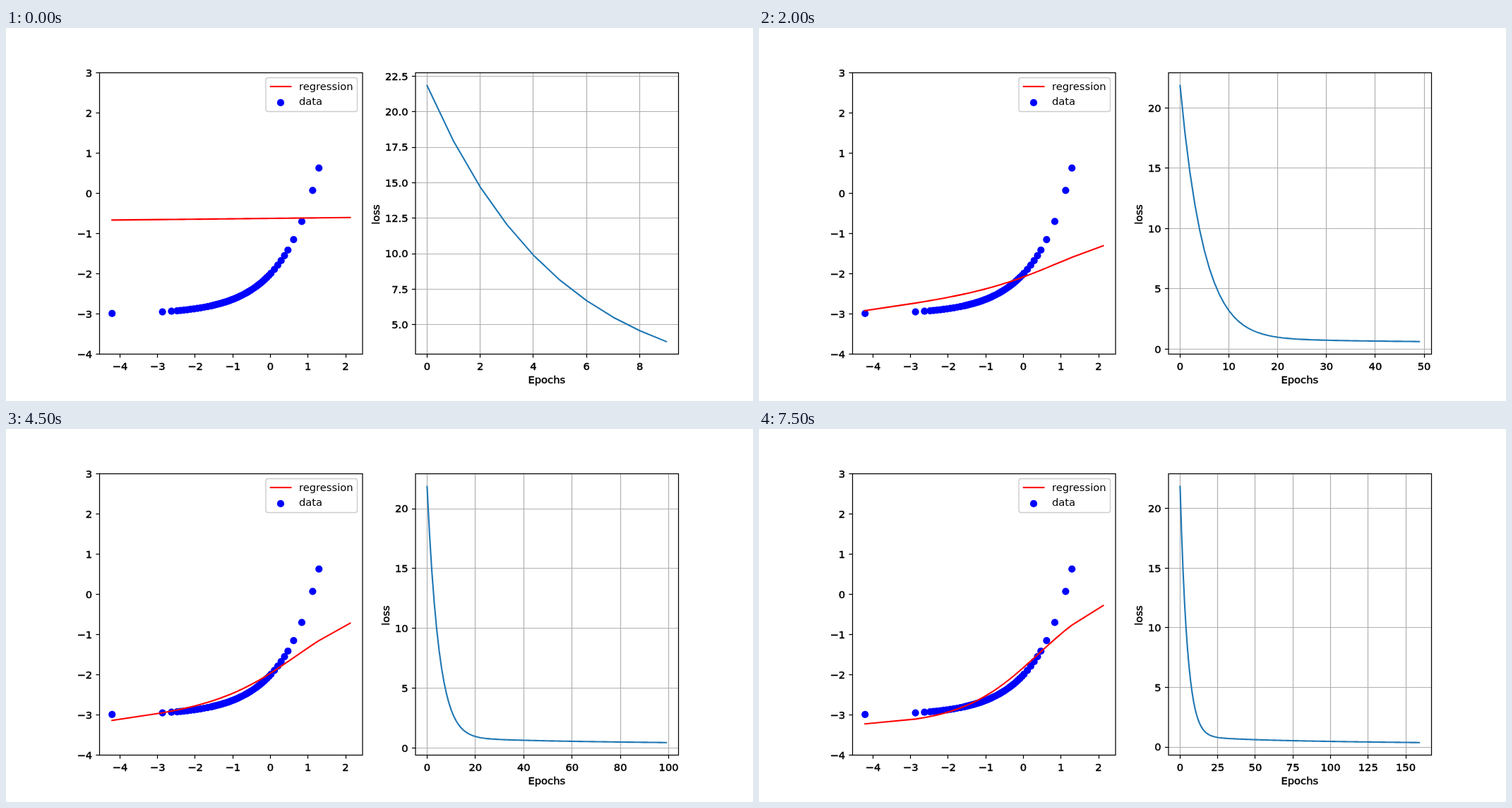
An HTML page that plays this animation: 1058 px wide and 529 px high, repeating every 8 s.

```html
<!DOCTYPE html>
<html lang="en">
<head>
<meta charset="utf-8">
<title>Regression training</title>
<style>
html, body { margin: 0; width: 100%; height: 100%; overflow: hidden; background: #fff; }
svg { display: block; width: 100vw; height: 100vh; }
text { font: 14.69px "DejaVu Sans", sans-serif; }
.tick, .name { stroke: #000; stroke-width: .45px; }
.axis { fill: none; stroke: #000; stroke-width: 1.25; }
.grid { fill: none; stroke: #b0b0b0; stroke-width: 1.2; }
.curve { fill: none; stroke-width: 2.1; stroke-linecap: square; stroke-linejoin: round; }
</style>
</head>
<body>
<svg viewBox="0 0 1058 529">
  <g id="left"></g>
  <g id="dots" fill="#00f"></g>
  <path id="fit" class="curve" stroke="#f00"/>
  <rect class="axis" x="132.5" y="63.5" width="372.5" height="399"/>
  <rect x="368" y="70.5" width="129.5" height="48" rx="2.9" fill="#fff" fill-opacity=".8" stroke="#ccc" stroke-width="1.4"/>
  <path class="curve" stroke="#f00" d="M374.8 83H403.4"/>
  <circle cx="389" cy="105.9" r="5.1" fill="#00f"/>
  <text x="415" y="88">regression</text>
  <text x="415" y="109.2">data</text>
  <g id="right"></g>
  <path id="loss" class="curve" stroke="#1f77b4"/>
  <rect class="axis" x="580" y="63.5" width="372.5" height="399"/>
  <text class="name" x="765.8" y="504.2" text-anchor="middle">Epochs</text>
  <text class="name" id="lossName" text-anchor="middle">loss</text>
</svg>
<script>
const $ = id => document.getElementById(id);
const TOP = 63.48, BOTTOM = 462.87, HEIGHT = BOTTOM - TOP;
const snap = v => Math.floor(v) + 0.5;
const polyline = pts => 'M' + pts.map(p => p[0].toFixed(2) + ' ' + p[1].toFixed(2)).join('L');

function ticks(lo, hi, step) {
  const out = [];
  for (let v = Math.ceil(lo / step) * step; v <= hi; v += step) out.push(v);
  return out;
}

function label(v, step) {
  return (v < 0 ? '\u2212' : '') + Math.abs(v).toFixed(step % 1 ? 1 : 0);
}

function xTick(x, text) {
  return `<path class="axis" d="M${snap(x)} ${snap(BOTTOM)}v5.1"/>` +
    `<text class="tick" x="${x}" y="484.5" text-anchor="middle">${text}</text>`;
}

function yTick(left, y, text) {
  return `<path class="axis" d="M${left} ${snap(y)}h-5.1"/>` +
    `<text class="tick" x="${left - 10.4}" y="${y + 5.3}" text-anchor="end">${text}</text>`;
}

// Left plot: fixed axes and samples of exp(x) - 3
const dataX = x => 374.5 + x * 53.27;
const dataY = y => BOTTOM - (y + 4) * HEIGHT / 7;

$('left').innerHTML =
  ticks(-4, 2, 1).map(v => xTick(dataX(v), label(v, 1))).join('') +
  ticks(-4, 3, 1).map(v => yTick(132.5, dataY(v), label(v, 1))).join('');

// Sparse outliers around a cluster that is densest near -0.8
const samples = [-4.21, -2.87, -2.63, 0.617, 0.8345, 1.1235, 1.29, 2.12];
for (let x = -2.48; x < 0.5; x += Math.abs(x + 0.8) < 0.8 ? 0.055 : 0.09) samples.push(x);
samples.sort((a, b) => a - b);

$('dots').innerHTML = samples.filter(x => x < 2).map(x =>
  `<circle cx="${dataX(x)}" cy="${dataY(Math.exp(x) - 3)}" r="5.1"/>`).join('');

// The fit leaves its flat start quickly, then a tanh bend grows and moves left
function fitAt(x, k) {
  const level = -2.17 + 0.0235 * k;
  const slope = 0.128 - 0.00095 * (k - 4.5) ** 2;
  const bend = 0.04 + 0.125 * k - 0.0011 * k * k;
  const center = 1.05 - 0.043 * k;
  const trained = level + slope * x + bend * (Math.tanh((x - center) / 2) + Math.tanh(center / 2));
  const untrained = -0.62 + 0.01 * x;
  return trained + (untrained - trained) * Math.exp(-1.1 * k ** 1.4);
}

function drawFit(k) {
  $('fit').setAttribute('d', polyline(samples.map(x => [dataX(x), dataY(fitAt(x, k))])));
}

// Right plot: loss history with rescaled axes
function lossAt(e) {
  return 20.393 * Math.exp(-e * (0.2038 + 0.0017 * e)) + 1.457 - 0.2135 * Math.log(e + 1);
}

function niceStep(span, bins) {
  const raw = span / bins, unit = 10 ** Math.floor(Math.log10(raw));
  return [1, 2, 2.5, 5, 10].find(m => m * unit >= raw) * unit;
}

function drawLoss(count) {
  const end = count - 1, high = lossAt(0), low = lossAt(end), range = high - low;
  const px = e => 596.4 + 338.8 * e / end;
  const py = v => TOP + HEIGHT * (0.05 + (high - v) / range) / 1.1;
  const xStep = niceStep(end * 1.1, 8), yStep = niceStep(range * 1.1, 9);
  const xs = ticks(-0.05 * end, 1.05 * end, xStep);
  const ys = ticks(low - 0.05 * range, high + 0.05 * range, yStep);
  $('right').innerHTML =
    xs.map(v => `<path class="grid" d="M${snap(px(v))} ${TOP}V${BOTTOM}"/>`).join('') +
    ys.map(v => `<path class="grid" d="M580 ${snap(py(v))}H952.5"/>`).join('') +
    xs.map(v => xTick(px(v), label(v, xStep))).join('') +
    ys.map(v => yTick(580, py(v), label(v, yStep))).join('');
  $('loss').setAttribute('d', polyline(Array.from({ length: count }, (_, e) => [px(e), py(lossAt(e))])));
  const nameX = yStep % 1 ? 529 : 543;
  $('lossName').setAttribute('transform', `translate(${nameX} 264.5) rotate(-90)`);
}

let shown = -1;
function render(now) {
  const step = Math.floor(now % 8000 / 500);
  if (step !== shown) {
    shown = step;
    drawFit(step);
    drawLoss(10 * (step + 1));
  }
}

const start = performance.now();
function tick() {
  render(performance.now() - start);
  requestAnimationFrame(tick);
}
tick();
</script>
</body>
</html>
```
